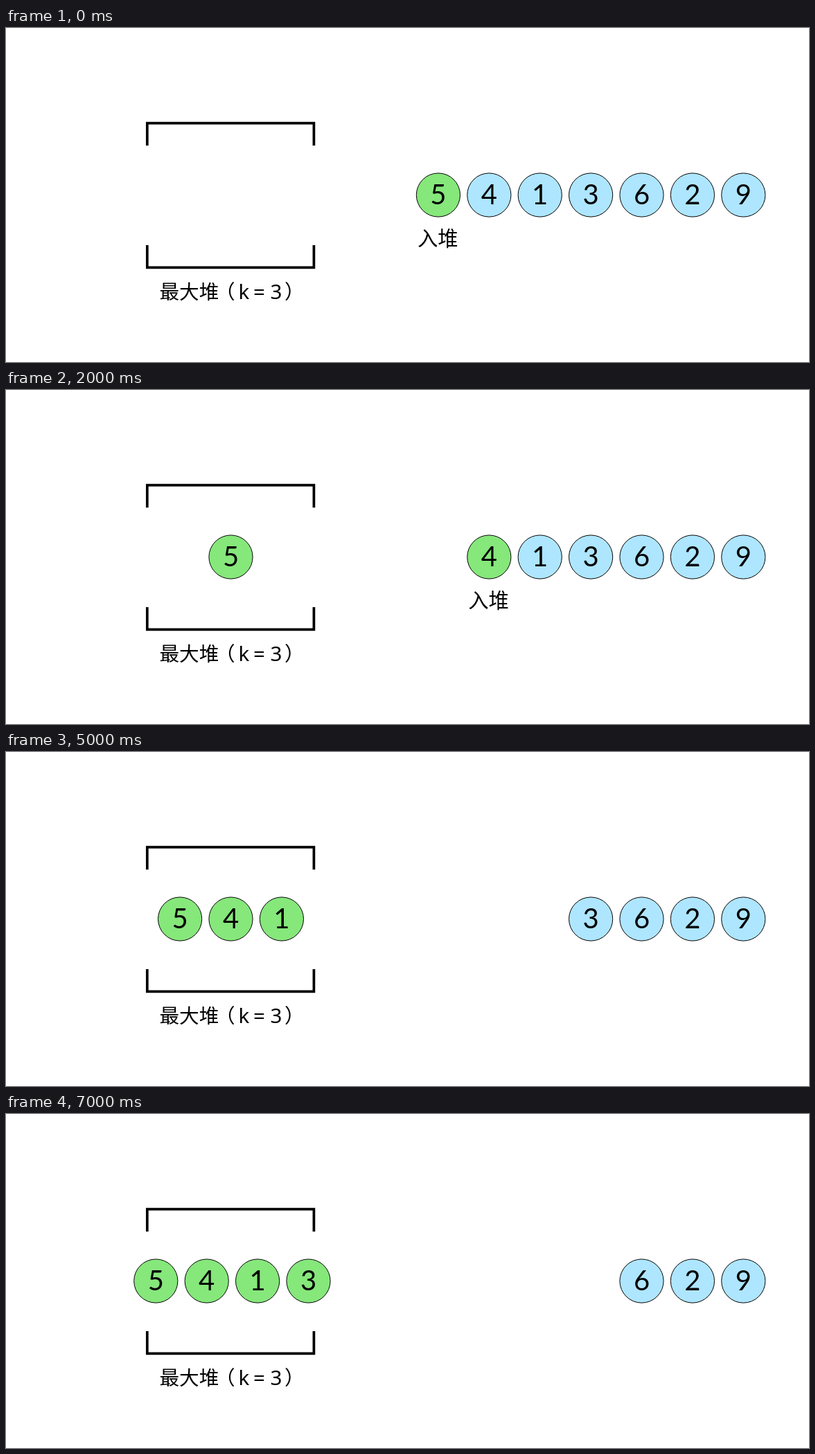
Recreate the animation shown at these times as an HTML page. Size 1159x483 px, loop 8 s.

```html
<!DOCTYPE html>
<html lang="zh-CN">
<head>
<meta charset="utf-8">
<style>
html, body { margin: 0; width: 100%; height: 100%; overflow: hidden; background: #fff; }
svg { display: block; width: 100%; height: 100%; }
text { font-family: "Noto Sans CJK SC", "Noto Sans CJK", sans-serif; font-size: 28.6px; text-spacing-trim: space-all; }
.latin { font-family: "Noto Sans", sans-serif; font-size: 29.5px; text-anchor: middle; }
.digit { font-family: Lato, sans-serif; font-size: 40px; text-anchor: middle; }
#in { font-size: 29.3px; }
</style>
</head>
<body>
<svg viewBox="0 0 1159 483">
  <path d="M203.8 170V137.6H444.4V170M203.8 314V346.4H444.4V314" fill="none" stroke="#000" stroke-width="3.7"/>
  <text x="221.5" y="391.5">最大堆</text>
  <text x="302" y="391.5">（</text>
  <text class="latin" x="343.5" y="391.5">k</text>
  <text class="latin" x="365.5" y="391.5">=</text>
  <text class="latin" x="390" y="391.5">3</text>
  <text x="402" y="391.5">）</text>
  <g id="balls"></g>
  <text id="in" y="315">入堆</text>
</svg>
<script>
const VALUES = [5, 4, 1, 3, 6, 2, 9];
const GAP = 73.4, QUEUE_X = 623.9, STEP = 1000, LOOP = 8000;
const GREEN = '#86e77b', BLUE = '#aee6ff';
const label = document.getElementById('in');

function add(parent, tag, attrs) {
  const el = document.createElementNS('http://www.w3.org/2000/svg', tag);
  for (const key in attrs) el.setAttribute(key, attrs[key]);
  return parent.appendChild(el);
}

const balls = VALUES.map(value => {
  const group = add(document.getElementById('balls'), 'g', {});
  const disc = add(group, 'circle', { cy: 241.5, r: 31.6, stroke: '#000', 'stroke-width': 1 });
  add(group, 'text', { class: 'digit', y: 255.3 }).textContent = value;
  return { group, disc };
});

const queueX = i => QUEUE_X + i * GAP;

// Even steps mark the next ball, odd steps move it into the heap.
function draw(time) {
  const step = Math.floor(time % LOOP / STEP);
  const count = Math.ceil(step / 2);
  const marking = step % 2 === 0;
  const middle = count % 2 ? 324.5 : 326.4;
  const heapX = i => middle + (i - (count - 1) / 2) * GAP;

  balls.forEach(({ group, disc }, i) => {
    const inHeap = i < count;
    const x = inHeap ? heapX(i) : queueX(i);
    group.setAttribute('transform', `translate(${x} 0)`);
    disc.setAttribute('fill', inHeap || marking && i === count ? GREEN : BLUE);
  });
  label.setAttribute('x', queueX(count) - 30);
  label.setAttribute('visibility', marking ? 'visible' : 'hidden');
}

const start = performance.now();
function tick() {
  draw(performance.now() - start);
  requestAnimationFrame(tick);
}
tick();
</script>
</body>
</html>
```
